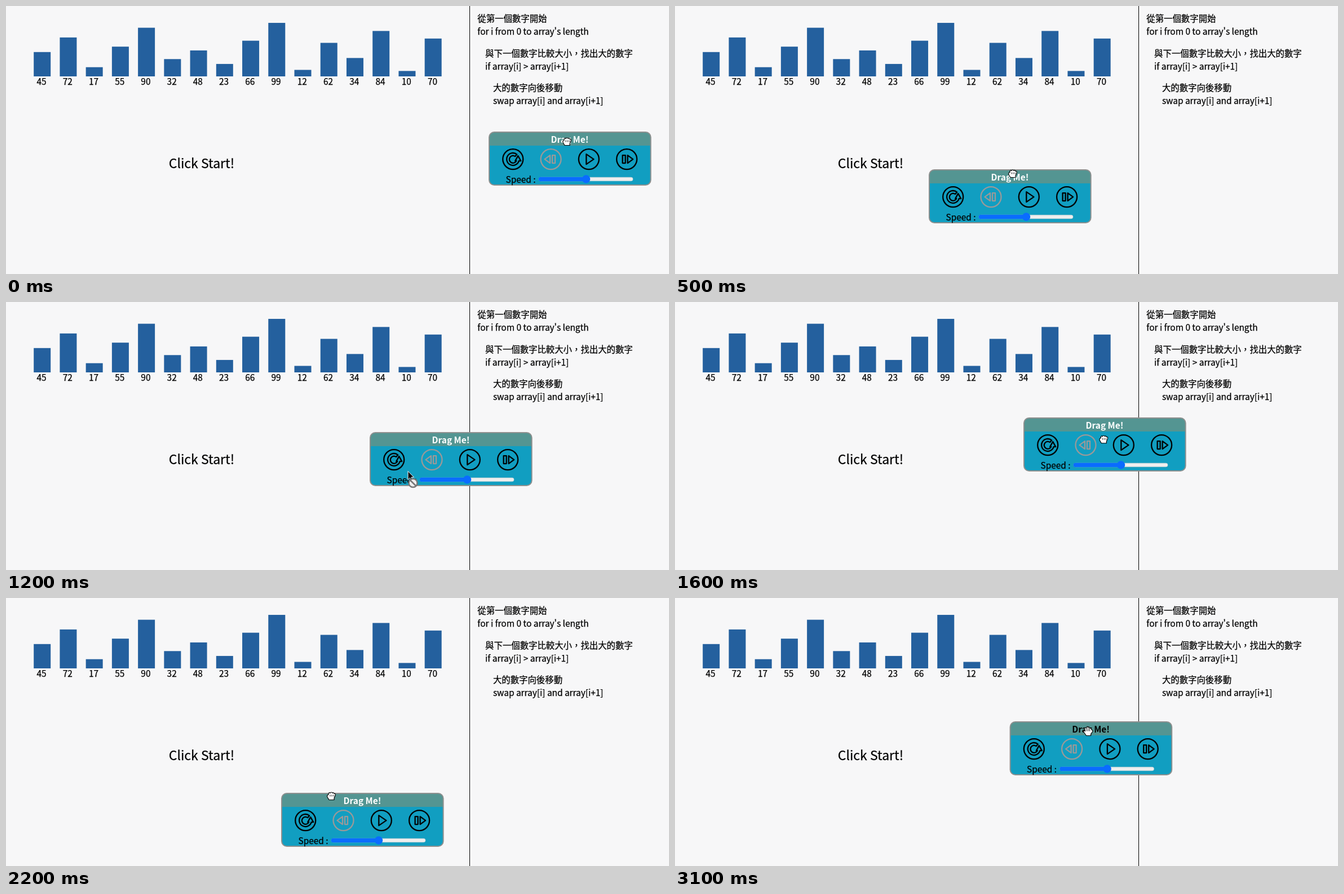
Write an HTML page that moves like this. It is 1176 px wide and 476 px high and loops after 3.2 s.

```html
<!DOCTYPE html>
<html lang="zh-Hant">
<head>
<meta charset="utf-8">
<title>Bubble sort</title>
<style>
  html, body { margin: 0; width: 100%; height: 100%; overflow: hidden; background: #f7f7f8; }
  svg { display: block; font: 15.4px "Noto Sans CJK TC", "Noto Sans CJK JP", "Noto Sans CJK", sans-serif; }
  text { stroke: #000; stroke-width: .25; }
  #title { stroke: none; font-weight: 700; }
  .icon { fill: none; stroke: #000; stroke-width: 2.3; stroke-linejoin: round; }
  .off { stroke: #999; }
  .mid { text-anchor: middle; }
  .hand { fill: #fff; stroke: #000; stroke-width: 1.2; stroke-linejoin: round; }
</style>
</head>
<body>
<svg width="1176" height="476" viewBox="0 0 1176 476">
  <g id="bars"></g>
  <rect x="822" width="1" height="476"/>
  <text class="mid" x="347" y="288" font-size="23">Click Start!</text>
  <g id="steps"></g>

  <g id="panel">
    <rect x="1" y="1" width="286.6" height="94" rx="9" fill="#119ec1"/>
    <path d="M1 25V10A9 9 0 0 1 10 1H278.6A9 9 0 0 1 287.6 10V25Z" fill="#549592"/>
    <rect x="1" y="1" width="286.6" height="94" rx="9" fill="none" stroke="#8e908f" stroke-width="2"/>
    <text id="title" class="mid" x="144" y="20">Drag Me!</text>
    <g id="icons"></g>
    <text x="30.5" y="90.5">Speed :</text>
    <rect x="89" y="81.2" width="167" height="6.6" rx="3.3" fill="#efefef" stroke="#c4cbcc" stroke-width=".6"/>
    <rect x="88.6" y="80.8" width="85" height="7.4" rx="3.7" fill="#0a6cff"/>
    <circle cx="173" cy="84.5" r="7.2" fill="#0a6cff"/>
  </g>

  <g id="pointer">
    <g id="closed" class="hand">
      <path d="M-4 7L-7 2Q-8-2-5-2V-4Q-4-7-2-5Q0-8 2-5Q4-7 5-4Q8-5 7-1L5 4V7Z"/>
      <path d="M-2-2V1M1-2V1M4-2V1" stroke-width=".9"/>
    </g>
    <g id="open" class="hand">
      <path d="M-3 8L-8 1Q-8-2-5 0L-6-5Q-5-8-3-5Q-2-10 0-7Q2-9 3-5Q6-7 6-3L7-2Q9-2 8 1L5 5V8Z"/>
      <path d="M-3-5L-2 0M0-7L.5 0M3-5V0" stroke-width=".9"/>
    </g>
    <g id="denied">
      <path d="M0 0V15L3.5 11.7L6 17L8.5 16L6 10.7H10.5Z" stroke="#fff"/>
      <circle cx="9" cy="21" r="7.5" fill="#eee" stroke="#777" stroke-width="2.5"/>
      <path d="M4 16L14 26" stroke="#777" stroke-width="2.5"/>
    </g>
  </g>
</svg>
<script>
const $ = id => document.getElementById(id);

const values = [45, 72, 17, 55, 90, 32, 48, 23, 66, 99, 12, 62, 34, 84, 10, 70];
$('bars').innerHTML = values.map((v, i) => {
  const x = 49.2 + i * 46.23, h = v * 0.96;
  return `<rect x="${x}" y="${125 - h}" width="30" height="${h}" fill="#24609e"/>
    <text class="mid" x="${x + 13.8}" y="139.7">${v}</text>`;
}).join('');

const steps = [
  ['從第一個數字開始', "for i from 0 to array's length"],
  ['與下一個數字比較大小，找出大的數字', 'if array[i] &gt; array[i+1]'],
  ['大的數字向後移動', 'swap array[i] and array[i+1]']
];
$('steps').innerHTML = steps.map((pair, i) => pair.map((line, j) =>
  `<text x="${836.3 + i * 13.8}" y="${28 + i * 61.5 + j * 23}">${line}</text>`
).join('')).join('');

const stepIcon = 'M11 0L1.5-7V7ZM-2.5-7H-7.5V7H-2.5Z';
const icons = [
  'M7-8.5A11 11 0 1 0 10.5 3H14L9-6L4 3H6A6.5 6.5 0 1 1 4-5Z',
  stepIcon,
  'M-4.5-9L8.7 0L-4.5 9Z',
  stepIcon
];
$('icons').innerHTML = icons.map((d, i) =>
  `<g class="icon ${i === 1 ? 'off' : ''}" transform="translate(${43.2 + i * 67.3} 49.1)">
    <circle r="18"/><path d="${d}" transform="scale(${i === 1 ? -1 : 1} 1)"/></g>`
).join('');

// Turning points of the drag: [tick, left, top]
const path = [
  [0, 856, 223], [3, 610, 358], [5, 450, 290], [6, 460, 280], [8, 563, 351],
  [9, 447, 352], [12, 645, 231], [13, 574, 283], [16, 618, 205], [20, 600, 340],
  [22, 488, 346], [23, 438, 334], [25, 540, 205], [31, 593.6, 219]
];

function slope(i, axis) {
  const a = path[i - 1], b = path[i + 1];
  return a && b ? (b[axis] - a[axis]) / (b[0] - a[0]) : 0;
}

// Smooth cubic curve through the turning points
function at(tick) {
  const t = Math.min(tick, 31);
  const i = Math.max(1, path.findIndex(p => p[0] >= t));
  const a = path[i - 1], b = path[i], d = b[0] - a[0];
  const u = (t - a[0]) / d, w = 1 - u;
  return [1, 2].map(k =>
    w * w * (a[k] * (1 + 2 * u) + u * d * slope(i - 1, k)) +
    u * u * (b[k] * (1 + 2 * w) - w * d * slope(i, k)));
}

const move = (id, x, y) => $(id).setAttribute('transform', `translate(${x} ${y})`);

const start = performance.now();
function draw(now) {
  const tick = Math.floor(Math.max(0, now - start) % 3200 / 100);
  const [x, y] = at(tick);
  const [px, py] = at(tick && tick + 1); // the panel lags one tick behind the pointer
  const mode = tick === 31 ? 'open' : tick === 12 ? 'denied' : 'closed';
  move('panel', x, y);
  move('pointer', px + 139, py + 17.5);
  for (const id of ['closed', 'open', 'denied']) $(id).style.display = id === mode ? '' : 'none';
  $('title').setAttribute('fill', mode === 'open' ? '#000' : '#fff');
  requestAnimationFrame(draw);
}
draw(start);
</script>
</body>
</html>
```
